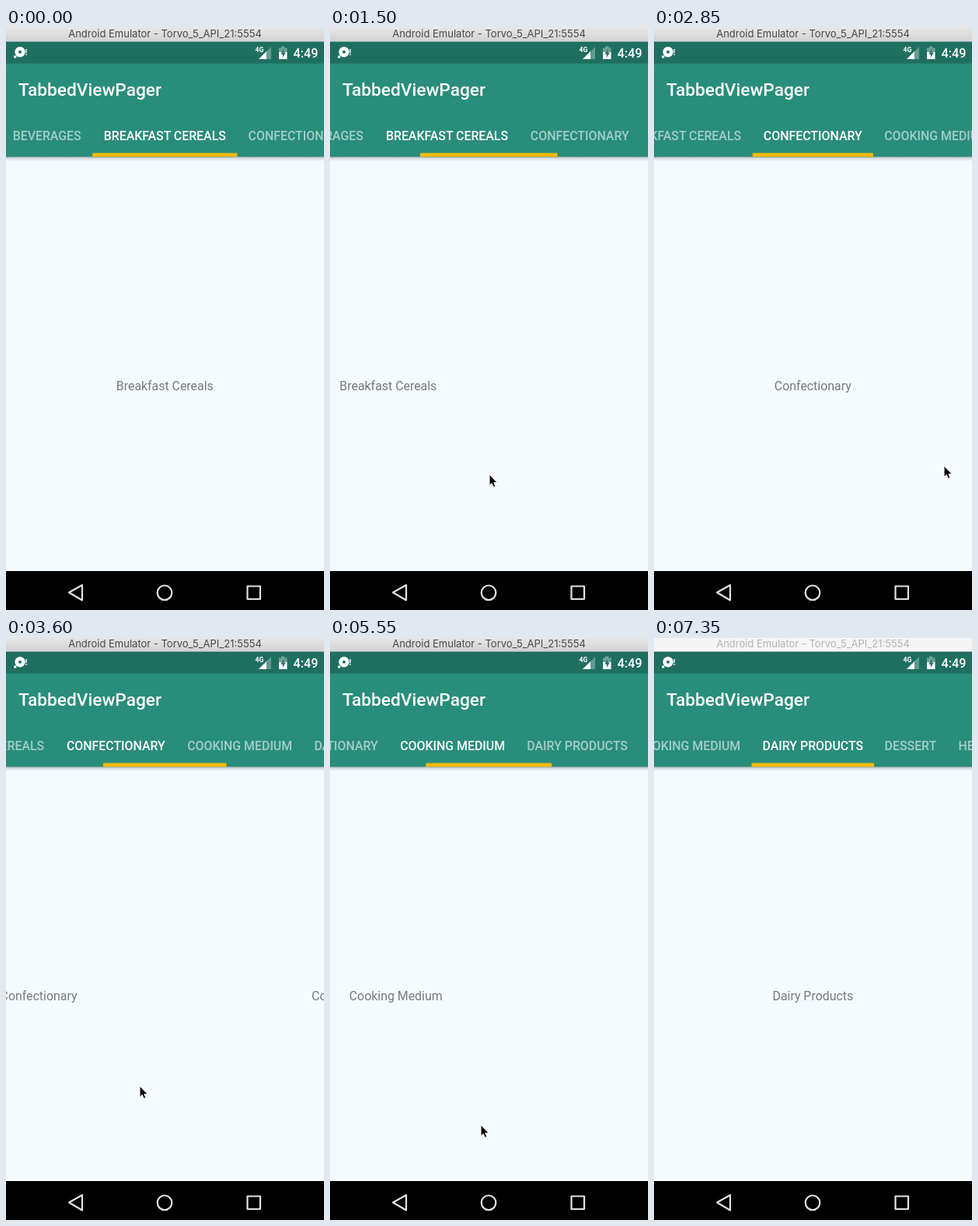
An HTML page that plays this animation: 409 px wide and 747 px high, repeating every 7.45 s.

```html
<!DOCTYPE html>
<html lang="en">
<head>
<meta charset="utf-8">
<title>TabbedViewPager</title>
<style>
  html, body { margin: 0; width: 100%; height: 100%; overflow: hidden; background: #f5fbff; }
  svg { display: block; width: 409px; height: 747px; font-family: Roboto, sans-serif; }
  .mid { text-anchor: middle; }
  .medium { font-weight: 500; fill: #fff; }
  .tab { font-size: 15.9px; }
  .page { font-size: 15.9px; fill: #747a7e; }
</style>
</head>
<body>
<svg viewBox="0 0 409 747">
  <defs>
    <linearGradient id="chrome" x2="0" y2="1">
      <stop offset="0" stop-color="#e6e6e6"/>
      <stop offset="1" stop-color="#d2d2d2"/>
    </linearGradient>
    <linearGradient id="shade" x2="0" y2="1">
      <stop offset="0" stop-color="#000" stop-opacity=".32"/>
      <stop offset=".4" stop-color="#000" stop-opacity=".12"/>
      <stop offset="1" stop-color="#000" stop-opacity="0"/>
    </linearGradient>
  </defs>

  <rect width="409" height="747" fill="#f5fbff"/>
  <g id="pages"></g>

  <rect y="165" width="409" height="6" fill="url(#shade)"/>
  <rect y="45" width="409" height="120.3" fill="#298d7b"/>
  <text class="medium" x="16" y="87" font-size="22.7">TabbedViewPager</text>
  <g id="tabs"></g>
  <rect id="bar" y="160.5" height="4.8" fill="#fdb90b"/>

  <!-- window title -->
  <rect id="head" width="409" height="17.5"/>
  <text id="name" class="mid" x="204.5" y="12" font-family="Inter, sans-serif" font-size="13">Android Emulator - Torvo_5_API_21:5554</text>

  <!-- status bar -->
  <rect y="17.5" width="409" height="28" fill="#1f6f60"/>
  <g fill="#fff">
    <circle cx="18" cy="30.8" r="6.7"/>
    <circle cx="11.7" cy="37" r="1.8"/>
    <rect x="25.2" y="27" width="1.6" height="5" opacity=".85"/>
    <rect x="25.2" y="33" width="1.6" height="1.8" opacity=".85"/>
    <circle cx="18" cy="30.8" r="2" fill="#1f6f60"/>
    <text x="320.5" y="31" font-size="8.6" font-weight="700">4G</text>
    <path d="M341 24V40H325Z" opacity=".3"/>
    <path d="M335 30V40H325Z"/>
    <path d="M354 23.5h4.5v2h3V32h-10.500v-6.500h3Z" opacity=".35"/>
    <path d="M351 31h10.500v9h-10.500Z"/>
    <path d="M357.300 27l-4 6.500h2.500v4.500l4-6.500h-2.500Z" fill="#1f6f60"/>
    <text class="medium" x="369.500" y="38" font-size="16.300">4:49</text>
  </g>

  <!-- navigation bar -->
  <rect y="697" width="409" height="50"/>
  <g fill="none" stroke="#e2e2e2" stroke-width="2.200" stroke-linejoin="round">
    <path d="M81 724.500L98 715V734.500Z"/>
    <circle cx="204" cy="724.800" r="9.300"/>
    <rect x="310.500" y="716.500" width="16.500" height="16.500"/>
  </g>

  <path id="cursor" d="M0 0V14.300L3.200 11.400L5.400 16.300L7.900 15.200L5.800 10.500H10.200Z"
        stroke="#fff" stroke-width="1" stroke-linejoin="round"/>
</svg>
<script>
const LOOP = 7450, STEP = 150, MID = 204.3, PITCH = 411;
const DRAG = 600, SETTLE = 600;

const tabs = [
  ["Beverages", 117], ["Breakfast Cereals", 186.3], ["Confectionary", 155.2],
  ["Cooking Medium", 163.4], ["Dairy Products", 157.6], ["Dessert", 93.7], ["Health", 88]
].map(([label, w]) => ({ label, w }));

// start of each swipe and the share of a page dragged before release
const swipes = [[1050, 0.485], [3150, 0.608], [5100, 0.448]];

// cursor tip: time, x, y
const trail = [
  [300, 440, 556], [750, 352, 566], [1050, 334, 570], [1200, 309, 571], [1350, 267, 573],
  [1500, 205, 573], [1650, 136, 578], [1950, 120, 575], [2400, 120, 575],
  [2850, 373, 562], [3150, 335, 566], [3300, 303, 569], [3450, 247, 572],
  [3600, 172, 575], [3750, 120, 575], [4500, 120, 575],
  [4650, 157, 579], [4950, 322, 616], [5100, 313, 621], [5250, 290, 623],
  [5400, 249, 625], [5550, 194, 625], [5700, 129, 624], [5950, -20, 618]
];

const $ = id => document.getElementById(id);

function addText(parent, cls, y, str) {
  const el = document.createElementNS("http://www.w3.org/2000/svg", "text");
  el.setAttribute("class", "mid " + cls);
  el.setAttribute("y", y);
  el.textContent = str;
  return $(parent).appendChild(el);
}

let edge = 0;
for (const tab of tabs) {
  tab.x = edge;
  edge += tab.w;
  tab.title = addText("tabs", "medium tab", 144, tab.label.toUpperCase());
  tab.page = addText("pages", "page", 465, tab.label);
}

const mix = (a, b, u) => a + (b - a) * u;
const clamp = u => Math.max(0, Math.min(1, u));

function swipe(t, start, share) {
  const pull = clamp((t - start) / DRAG);
  const fling = clamp((t - start - DRAG) / SETTLE);
  return mix(share * pull ** 1.5, 1, 1 - (1 - fling) ** 5);
}

const position = t =>
  swipes.reduce((sum, [start, share]) => sum + (t > start ? swipe(t, start, share) : 0), 1);

function moveCursor(t) {
  const i = trail.findIndex(p => p[0] > t);
  const shown = i > 0;
  $("cursor").style.display = shown ? "" : "none";
  if (!shown) return;
  const a = trail[i - 1], b = trail[i], u = (t - a[0]) / (b[0] - a[0]);
  $("cursor").setAttribute("transform", `translate(${mix(a[1], b[1], u)} ${mix(a[2], b[2], u)})`);
}

function draw(time) {
  const t = Math.floor(time % LOOP / STEP) * STEP;
  const pos = position(t), i = Math.floor(pos), u = pos - i;
  const cur = tabs[i], next = tabs[i + 1];
  const scroll = mix(cur.x + cur.w / 2, next.x + next.w / 2, u) - MID;

  tabs.forEach((tab, n) => {
    tab.title.setAttribute("x", tab.x + tab.w / 2 - scroll);
    tab.title.setAttribute("fill-opacity", n === Math.round(pos) ? 1 : 0.57);
    tab.page.setAttribute("x", MID + (n - pos) * PITCH);
  });

  const left = mix(cur.x, next.x, u);
  const right = mix(cur.x + cur.w, next.x + next.w, u);
  $("bar").setAttribute("x", left - scroll);
  $("bar").setAttribute("width", right - left);

  const idle = t >= 7350;
  $("head").setAttribute("fill", idle ? "#f5f5f5" : "url(#chrome)");
  $("name").setAttribute("fill", idle ? "#b4b4b4" : "#484848");
  moveCursor(t);
}

const begin = performance.now();
function tick() {
  draw(performance.now() - begin);
  requestAnimationFrame(tick);
}
tick();
</script>
</body>
</html>
```
